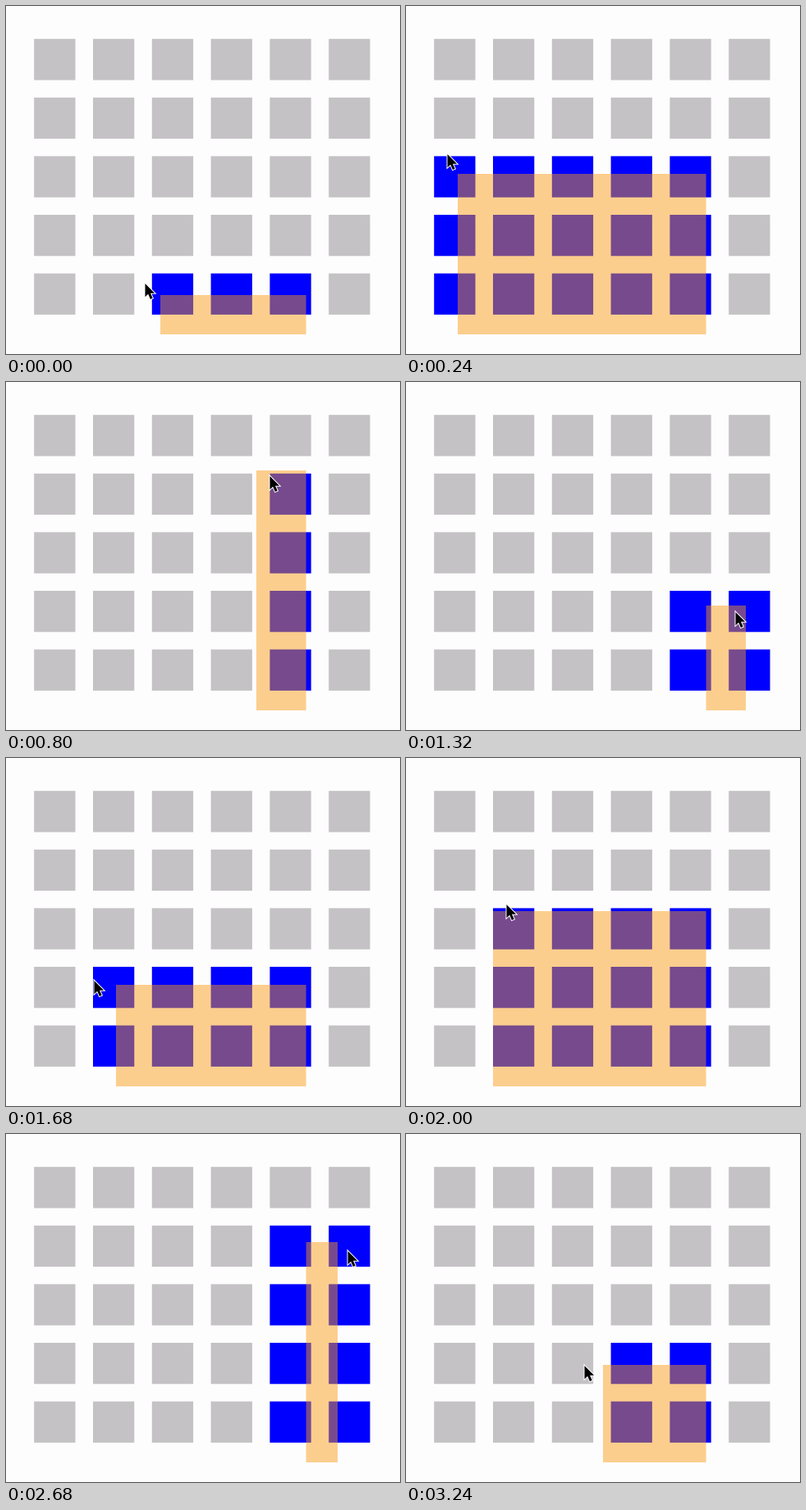
An HTML page for the animation above (3280 ms loop, 480x425 px).

```html
<!DOCTYPE html>
<html lang="en">
<head>
<meta charset="utf-8">
<title>Drag selection</title>
<style>
  html, body { margin: 0; width: 100%; height: 100%; overflow: hidden; background: #fefdfe; }
  svg { display: block; width: 480px; height: 425px; }
</style>
</head>
<body>
<svg viewBox="0 0 480 425">
  <g id="tiles"></g>
  <rect id="band" fill="rgb(248,156,18)" fill-opacity=".48"/>
  <path id="pointer" d="M0 0V16.2L3.7 12.7 6.4 19 9.2 17.8 6.5 11.7H11.6Z"
    fill="#000" stroke="#fff" stroke-width="2" paint-order="stroke"/>
</svg>
<script>
const LOOP = 3280, STEP = 40;
const COLS = 6, ROWS = 5, PITCH = 71.8, SIZE = 50.3;
const anchor = { x: 365.6, y: 401 };

// Turning points of the drag
const keys = [
  { t: 0, x: 188, y: 353 }, { t: 40, x: 169, y: 338 },
  { t: 300, x: 46, y: 168 }, { t: 480, x: 106, y: 85 },
  { t: 620, x: 214, y: 85 }, { t: 800, x: 305, y: 108 },
  { t: 960, x: 362, y: 138 }, { t: 1160, x: 422, y: 228 },
  { t: 1320, x: 414, y: 273 }, { t: 1440, x: 355, y: 286 },
  { t: 1680, x: 134, y: 277 }, { t: 1840, x: 62, y: 240 },
  { t: 2000, x: 106, y: 187 }, { t: 2440, x: 299, y: 111 },
  { t: 2680, x: 404, y: 132 }, { t: 2880, x: 438, y: 197 },
  { t: 3060, x: 362, y: 266 }, { t: LOOP - STEP, x: 240, y: 282 },
  { t: LOOP, x: 217, y: 282 }
];

function slope(i, axis) {
  const a = keys[Math.max(i - 1, 0)], b = keys[Math.min(i + 1, keys.length - 1)];
  return (b[axis] - a[axis]) / (b.t - a.t);
}

// Cubic Hermite curve through the keys
function position(t) {
  const next = keys.findIndex(key => key.t >= t && key.t > 0), i = next - 1;
  const a = keys[i], b = keys[next], span = b.t - a.t, u = (t - a.t) / span;
  const value = axis => a[axis] + (b[axis] - a[axis]) * u * u * (3 - 2 * u)
    + span * u * (1 - u) * ((1 - u) * slope(i, axis) - u * slope(next, axis));
  return { x: Math.round(value('x')), y: Math.round(value('y')) };
}

function setAttrs(el, attrs) {
  for (const name in attrs) el.setAttribute(name, attrs[name]);
}

const layer = document.getElementById('tiles');
const band = document.getElementById('band');
const pointer = document.getElementById('pointer');

const tiles = Array.from({ length: COLS * ROWS }, (_, n) => {
  const x = 34.2 + n % COLS * PITCH, y = 40.2 + Math.floor(n / COLS) * (PITCH - 0.2);
  const el = document.createElementNS('http://www.w3.org/2000/svg', 'rect');
  setAttrs(el, { x, y, width: SIZE, height: SIZE });
  layer.append(el);
  return { el, x, y };
});

function render(t) {
  const corner = position(t);
  const tip = position(t + STEP); // the band trails the pointer by one step
  const box = {
    x: Math.min(corner.x, anchor.x),
    y: Math.min(corner.y, anchor.y),
    width: Math.abs(corner.x - anchor.x),
    height: Math.abs(corner.y - anchor.y)
  };
  setAttrs(band, box);
  for (const { el, x, y } of tiles) {
    const hit = x < box.x + box.width && x + SIZE > box.x
      && y < box.y + box.height && y + SIZE > box.y;
    el.setAttribute('fill', hit ? '#0000fe' : '#c4c2c4');
  }
  pointer.setAttribute('transform', `translate(${tip.x + 0.5} ${tip.y + 1})`);
}

const start = performance.now();
function tick() {
  const elapsed = Math.max(0, performance.now() - start) % LOOP;
  render(Math.floor(elapsed / STEP) * STEP);
  requestAnimationFrame(tick);
}
tick();
</script>
</body>
</html>
```
